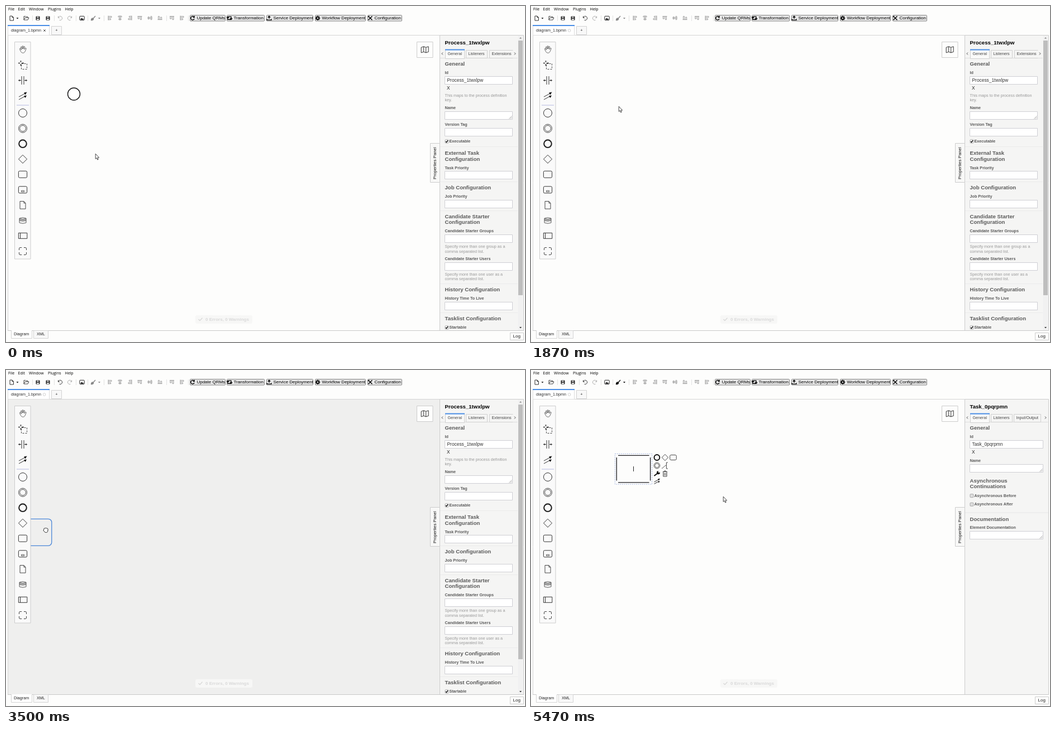
Recreate the animation shown at these times as an HTML page with a canvas. Size 929x603 px, loop 5530 ms.

```html
<!DOCTYPE html>
<html lang="en">
<head>
<meta charset="utf-8">
<title>Process modeler</title>
<style>
html, body { margin: 0; width: 100%; height: 100%; overflow: hidden; background: #fdfdfc; }
canvas { display: block; }
</style>
</head>
<body>
<canvas id="stage" width="929" height="603"></canvas>
<script>
const ctx = document.getElementById('stage').getContext('2d');
const LOOP = 5530;
const SANS = '"Liberation Sans", Arial, sans-serif';
const MENU = '"Open Sans", "Noto Sans", sans-serif';
const PAPER = '#fdfdfc', PANEL = '#f5f5f4';
const INK = '#333', LABEL = '#5a5a5a', BORDER = '#c8c8c8', BLUE = '#4a8ee6';

// Moments at which the state switches, in ms.
const HOVER = 440, SELECT = 800, REMOVE = 1770, GRAB = 3360, DRAG = 3400, BEAM = 4270, DROP = 4300;

const cursorKeys = [
  [30, 160, 265], [150, 150, 237], [300, 134, 190], [420, 125, 165], [500, 122, 158],
  [1130, 122, 158], [1230, 140, 175], [1400, 152, 179], [1600, 157, 180],
  [2330, 157, 180], [2450, 132, 220], [2630, 70, 286], [2760, 38, 299], [2870, 26, 301],
  [2900, 26, 301], [3130, 37, 302], [3330, 37, 302], [3500, 71, 288], [3700, 125, 242],
  [3870, 168, 205], [4000, 193, 187], [4100, 189, 183],
  [5170, 189, 183], [5260, 222, 197], [5370, 305, 219], [5470, 344, 227]
];
const shapeKeys = [
  [3330, 36, 300], [3400, 39, 298], [3500, 51.5, 291.5], [3700, 105, 248],
  [3870, 154.5, 204.5], [4000, 189, 183], [4100, 183.5, 177.5]
];

function track(keys, t) {
  if (t <= keys[0][0]) return keys[0].slice(1);
  for (let i = 1; i < keys.length; i++) {
    const [t0, x0, y0] = keys[i - 1], [t1, x1, y1] = keys[i];
    if (t <= t1) {
      const k = (t - t0) / (t1 - t0);
      return [x0 + (x1 - x0) * k, y0 + (y1 - y0) * k];
    }
  }
  return keys[keys.length - 1].slice(1);
}

function box(x, y, w, h, fill, stroke, radius = 0, lw = 1) {
  ctx.beginPath();
  ctx.roundRect(x, y, w, h, radius);
  if (fill) { ctx.fillStyle = fill; ctx.fill(); }
  if (stroke) { ctx.strokeStyle = stroke; ctx.lineWidth = lw; ctx.stroke(); }
}

function ring(x, y, r, lw = 1, color = INK, fill) {
  ctx.beginPath();
  ctx.arc(x, y, r, 0, 7);
  if (fill) { ctx.fillStyle = fill; ctx.fill(); }
  ctx.strokeStyle = color;
  ctx.lineWidth = lw;
  ctx.stroke();
}

function icon(x, y, d, { color = INK, lw = 1, fill, scale = 1, angle = 0 } = {}) {
  const path = new Path2D(d);
  ctx.save();
  ctx.translate(x, y);
  ctx.rotate(angle);
  ctx.scale(scale, scale);
  if (fill) { ctx.fillStyle = fill; ctx.fill(path); }
  if (lw) { ctx.strokeStyle = color; ctx.lineWidth = lw; ctx.stroke(path); }
  ctx.restore();
}

function text(s, x, y, size = 7.2, color = INK, weight = '', family = SANS) {
  ctx.font = `${weight} ${size}px ${family}`;
  ctx.fillStyle = color;
  ctx.textBaseline = 'middle';
  ctx.fillText(s, x, y);
}

const hline = (x0, x1, y, color = BORDER) => icon(0, 0, `M${x0} ${y}H${x1}`, { color });
const vline = (x, y0, y1, color = BORDER) => icon(0, 0, `M${x} ${y0}V${y1}`, { color });

const DIAMOND = 'M0-7.5L7.5 0L0 7.5L-7.5 0Z';
const CONNECT = 'M-7 2L4-4M-7 7L4 1';
const HEADS = 'M7.5-6.5L4.5-1.5L2-5.5ZM7-.5L4.5 4L2 .2Z';
const DOWN = 'M-2-1H2L0 1.4Z';

function toolbar(selected, dirty) {
  ['File', 'Edit', 'Window', 'Plugins', 'Help'].forEach((s, i) =>
    text(s, [4, 21.5, 41, 75, 105.5][i], 6, 7, '#000', '', MENU));

  const dim = '#a4a4a4', brush = selected ? '#111' : '#888';
  icon(10, 22, 'M-3-4H1L3.5-1.5V4H-3ZM1-4V-1.5H3.5');
  icon(36, 22, 'M-4 3V-3.5H-1L0-2.5H3V-1M-4 3L-2-1H5L3 3Z', { lw: .9 });
  for (const x of [57, 75]) {
    box(x - 3.5, 18.5, 7, 7, '#222', null, 1);
    box(x - 1.8, 19.2, 3.4, 2, '#ddd');
    box(x - 2, 22.8, 4, 2, '#fff');
  }
  const undo = 'M-3.5-1A3.6 3.6 0 1 1-1.5 3.2M-3.6-3.5V-.8H-1';
  icon(97, 22, undo, { color: dirty ? '#222' : dim, lw: .9 });
  icon(114, 22, 'M3.5-1A3.6 3.6 0 1 0 1.5 3.2M3.6-3.5V-.8H1', { color: dim, lw: .9 });
  box(131.8, 18.3, 8.4, 7, '#fff', '#222', 1);
  icon(136, 22, 'M-3 2.7L-1-1L.5 1L1.5 0L3.2 2.7Z', { lw: 0, fill: '#222' });
  icon(156, 22, 'M4-4L0 .5M-3.5 3.5C-3.5 0-1-1 .5 .8C1 2.5-1 4-3.5 3.5Z', { color: brush, lw: 1.4, fill: brush });
  icon(20.5, 22, DOWN, { lw: 0, fill: '#222' });
  icon(167, 22, DOWN, { lw: 0, fill: brush });
  for (const x of [47.5, 86.5, 125.5, 146.5, 175.5, 287.5, 326.5]) vline(x, 17, 27, '#e2e2e2');

  const align = 'M-3-4V4M-3-3H3V-1H-3M-3 1.2H1.5V3.2H-3';
  [0, 0, Math.PI, Math.PI / 2, Math.PI / 2, -Math.PI / 2, Math.PI / 2, 0].forEach((angle, i) =>
    icon([186, 204, 222, 239.5, 257.5, 275.5, 297, 315][i], 21.5,
      i === 1 || i === 4 ? 'M0-4V4M-3-3.5H3V-1.5H-3ZM-2 1.2H2V3.2H-2Z' : align,
      { color: '#8e8e8e', lw: .8, angle }));

  const buttons = [['Update QRMs', 329, 64], ['Transformation', 395, 68], ['Service Deployment', 466, 84],
    ['Workflow Deployment', 553, 91], ['Configuration', 647, 62]];
  buttons.forEach(([s, x, w], i) => {
    box(x + .5, 16.5, w - 1, 10.5, '#e8e8e8', '#808080', 1);
    text(s, x + 12.4, 22, 8, '#000');
    icon(x + 5, 21.8, [
      'M3 1A3.2 3.2 0 1 1 2-2.5M3.2-4V-1.5H.8',
      'M-3 2.5H2M-3 3V-2M-5-.5L-3-2.5L-1-.5M3-3V2M-2-2.7H3M1 .5L3 2.5L5 .5',
      'M0 1V-3M-2.2-1.3L0-3.6L2.2-1.3M-4 1.5V3.3H4V1.5',
      'M0-4.3V4.3M-4.3 0H4.3M-3-3L3 3M-3 3L3-3',
      'M-3.5-3.5L3.5 3.5M3.5-3.5L-3.5 3.5M-4-2L-2-4'][i], { color: '#000', lw: 1.4 });
    if (i === 3) ring(x + 5, 21.8, 2.2, 1.7, '#000', '#e8e8e8');
  });
}

function frameChrome(dirty) {
  box(3.5, 35.5, 74, 17, '#fff', '#ddd');
  box(3, 34, 75, 2, BLUE);
  text('diagram_1.bpmn', 9, 43.6, 7.2, '#333');
  if (dirty) ring(68.5, 44, 2.4, .8, '#c4c4c4');
  else icon(69, 44, 'M-1.8-1.8L1.8 1.8M1.8-1.8L-1.8 1.8', { lw: .9 });
  box(81.5, 36.5, 18, 15, '#f8f8f8', '#d2d2d2');
  text('+', 88.2, 43.6, 7.2);
}

function footer() {
  hline(3, 927, 582.5);
  box(9.5, 582.5, 37, 14, '#fff', '#d4d4d4');
  hline(10, 46, 582.5, '#fff');
  text('Diagram', 14, 589.3, 7.2, '#222');
  box(49.5, 582.5, 26, 14, '#f8f8f8', '#d4d4d4');
  text('XML', 55, 589.3, 7.2, '#222');
  box(902.5, 586.5, 24, 13, PAPER, '#ccc');
  text('Log', 907.5, 592.8, 8, '#222');
}

function palette() {
  box(15.5, 64.5, 28.5, 389.5, '#fafafa', '#ccc');
  const x = 30;
  icon(x, 78, 'M-6 0C-7-2-5-3-4-1L-3 1L-4-4C-4-6-2-6-2-4L-1-1V-6C-1-7.5 1-7.5 1-6V-1L2-5C2-6.5 4-6.5 4-5L3.5 0L5-2C6-3.5 8-2.5 6.5-.5L4 5C3 7.5-2 8-4 4Z', { lw: .8, scale: .9 });
  icon(x, 106, 'M-3.5-8V-5M-3.5-2V1.5M-8-3.5H-5M-2-3.5H2', { lw: 1.4 });
  ctx.setLineDash([3, 2]);
  box(27.5, 103.5, 10, 10, null, INK, 0, .9);
  ctx.setLineDash([]);
  icon(x, 133.5, 'M-2-7.5V7.5M2-7.5V7.5M-8 0H-3M3 0H8', { lw: 1 });
  icon(x, 133.5, 'M-4 0L-6.5-2V2ZM4 0L6.5-2V2Z', { lw: 0, fill: INK });
  icon(x, 161, CONNECT);
  icon(x, 161, HEADS, { lw: 0, fill: '#111' });
  hline(19, 41, 178, '#b4b9e0');
  ring(x, 192, 7.5);
  ring(x, 219.7, 7.5, .9); ring(x, 219.7, 5.4, .9);
  ring(x, 247.2, 6.8, 2.1, '#222');
  icon(x, 274.8, DIAMOND);
  box(22.4, 296.2, 15.2, 12, null, INK, 2);
  box(22.4, 323.8, 15.2, 12, null, INK, 2);
  box(27.5, 331.3, 5, 2.2, null, INK, 0, .8);
  icon(x, 357.3, 'M-5-6.8H2L5-3.5V6.8H-5ZM2-6.8V-3.5H5', { lw: .9 });
  icon(x, 385, 'M-6-4Q0-6.5 6-4V4Q0 6.5-6 4ZM-6-3.5Q0-1.3 6-3.5M-6-1.7Q0 .5 6-1.7M-6 .1Q0 2.3 6 .1', { lw: .8 });
  box(22.4, 407.3, 15.4, 10, null, INK);
  vline(25.5, 407, 417, INK);
  icon(x, 440, 'M-6.5-2V-4.5Q-6.5-6.5-4.5-6.5H-2M2-6.5H4.5Q6.5-6.5 6.5-4.5V-2M6.5 2V4.5Q6.5 6.5 4.5 6.5H2M-2 6.5H-4.5Q-6.5 6.5-6.5 4.5V2');
}

function overlays() {
  palette();
  box(735.5, 64.5, 28.5, 28, PAPER, '#ccc');
  icon(749.7, 78.3, 'M-6.5-4L-2-5.5L2-4L6.5-5.5V4L2 5.5L-2 4L-6.5 5.5ZM-2-5.5V4M2-4V5.5');
  box(339, 555, 102, 15, '#f7f7f6', null, 3);
  icon(348, 562.3, 'M-3.5 0L-1 2.3L3.5-2.5', { color: '#d8d8d8', lw: 1.3 });
  text('0 Errors, 0 Warnings', 357, 562.6, 8, '#d9d9d9', 'bold');
}

function field(y, right, area) {
  box(785.5, y + .5, right - 785.5, 14, '#fff', '#cfcfd4');
  if (area) icon(right - 1, y + 13.5, 'M-5 0L0-5M-2.5 0L0-2.5', { color: '#888', lw: .7 });
}

function check(s, y, on) {
  box(786, y - 3, 6, 6, on ? '#fff' : '#dedede', '#a2a2a2', 1, .9);
  if (on) icon(789, y, 'M-2 0L-.6 1.7L2.2-2', { lw: 1.3, color: '#111' });
  text(s, 793.4, y, 7.2, LABEL, 'bold');
}

const heading = (y, ...lines) => lines.forEach((s, i) => text(s, 785.5, y + i * 10.8, 9.6, LABEL, 'bold'));
const label = (s, y) => text(s, 785.5, y, 7.2, LABEL, 'bold');
const hint = (y, ...lines) => lines.forEach((s, i) => text(s, 785.5, y + i * 8.4, 7.2, '#999'));

function panelHead(id, tabs, right) {
  text(id, 785.5, 66.2, 9.6, '#000', 'bold');
  hline(777, right + 9, 93.5, '#ddd');
  ctx.save();
  ctx.beginPath();
  ctx.rect(780, 76, right - 779, 19);
  ctx.clip();
  tabs.forEach(([s, x, w], i) => {
    box(x + .5, i ? 79.5 : 78.5, w, i ? 14 : 16, i ? PANEL : '#fafaf9', '#d0d0d0');
    if (!i) box(x, 77.5, w + 1, 2, BLUE);
    text(s, x + 4.5, 86.2, 7.2, '#444');
  });
  ctx.restore();
  icon(781, 85.5, 'M1-2L-1 0L1 2', { lw: .9 });
  icon(right + 4.5, 85.5, 'M-1-2L1 0L-1 2', { lw: .9 });
  heading(104.4, 'General');
  label('Id', 120.2);
  field(126, right);
  text(id, 789.5, 133.5, 8.4, '#333');
  text('X', 789, 147.4, 8.4, '#222');
}

function processPanel() {
  const right = 906.5;
  panelHead('Process_1twxlpw', [['General', 786, 34], ['Listeners', 823, 38], ['Extensions', 865, 43]], right);
  hint(161, 'This maps to the process definition', 'key.');
  label('Name', 183.2); field(189, right, true);
  label('Version Tag', 213); field(219, right);
  check('Executable', 243, true);
  heading(264.4, 'External Task', 'Configuration');
  label('Task Priority', 290.8); field(296, right);
  heading(326.5, 'Job Configuration');
  label('Job Priority', 342.2); field(348, right);
  heading(378, 'Candidate Starter', 'Configuration');
  label('Candidate Starter Groups', 404.4); field(410, right);
  hint(432.3, 'Specify more than one group as a', 'comma separated list.');
  label('Candidate Starter Users', 454.2); field(460, right);
  hint(482, 'Specify more than one user as a', 'comma separated list.');
  heading(509.7, 'History Configuration');
  label('History Time To Live', 525.2); field(531, right);
  heading(561, 'Tasklist Configuration');
  check('Startable', 577, true);
  for (const y of [252.5, 315.5, 367.5, 498.5, 550.5]) hline(777, 916, y, '#ebebeb');

  box(916.5, 53, 9, 529, '#f1f1f1');
  box(917, 62, 8, 457, '#bebebe');
  icon(921, 57.5, 'M-2 1H2L0-1.4Z', { lw: 0, fill: '#888' });
  icon(921, 577, DOWN, { lw: 0, fill: '#333' });
}

function asyncGroup(y) {
  heading(y, 'Asynchronous', 'Continuations');
  check('Asynchronous Before', y + 26.7);
  check('Asynchronous After', y + 42.2);
  hline(777, 926, y + 57, '#e6e6e6');
  heading(y + 69, 'Documentation');
  label('Element Documentation', y + 84.5);
  field(y + 90, 916.5, true);
}

function elementPanel(isTask) {
  const right = 916.5;
  if (isTask) {
    panelHead('Task_0pqrpmn', [['General', 786, 34], ['Listeners', 823, 38], ['Input/Output', 864, 48]], right);
  } else {
    panelHead('StartEvent_1', [['General', 786, 34], ['Forms', 823, 29], ['Listeners', 855.5, 38], ['Extensions', 897, 43]], right);
  }
  label('Name', 163.2);
  field(169, right, true);
  if (isTask) return asyncGroup(199);
  heading(199, 'Details');
  label('Initiator', 215); field(220.5, right);
  asyncGroup(250.5);
}

function panel(kind) {
  box(776.5, 52.5, 150, 530, PANEL, '#ccc');
  ctx.save();
  ctx.beginPath();
  ctx.rect(777, 53, 149, 529);
  ctx.clip();
  if (kind === 'process') processPanel();
  else elementPanel(kind === 'task');
  ctx.restore();
  box(759.5, 246.5, 17, 70, '#f8f8f7', '#ccc');
  ctx.save();
  ctx.translate(768, 311);
  ctx.rotate(-Math.PI / 2);
  text('Properties Panel', 0, 0, 7.8, '#111');
  ctx.restore();
}

function contextPad(x, y) {
  const step = 14.5, x1 = x + step, y1 = y + step, y2 = y + 2 * step;
  ring(x, y, 4.9, 2, '#111');
  icon(x1, y, DIAMOND, { scale: .75, lw: 1.2 });
  box(x + 2 * step - 5.7, y - 4.5, 11.5, 9, null, INK, 2, .9);
  ring(x, y1, 5.4, .9, '#444'); ring(x, y1, 3.7, .9, '#444');
  icon(x1, y1, 'M5-5.5H2.5V5.5H5', { lw: .9 });
  ctx.setLineDash([1.5, 1]);
  icon(x1, y1, 'M-5.5 5L2-1', { lw: 1.1 });
  ctx.setLineDash([]);
  icon(x, y2, 'M-5 4L1-.5', { color: '#111', lw: 2 });
  icon(x, y2, 'M5.5-2A3 3 0 1 1 2.5-4.8L2.5-2Z', { lw: 0, fill: '#111' });
  icon(x1, y2, 'M-4-3.5H4M-1.5-3.5V-5H1.5V-3.5M-3.2-3V5H3.2V-3M-1.2-1.5V3.5M1.2-1.5V3.5', { lw: .9 });
  icon(x, y + 42.5, CONNECT, { scale: .7, lw: 1.3, color: '#111' });
  icon(x, y + 42.5, HEADS, { scale: .75, lw: 0, fill: '#111' });
}

function outline(x, y, w, h) {
  ctx.setLineDash([2, 1.6]);
  box(x, y, w, h, null, '#9db0e0', 0, .9);
  ctx.setLineDash([]);
}

function task(t) {
  outline(150.3, 150.3, 66.3, 54.8);
  icon(0, 0, 'M156 153.4H211.5M156 201.8H211.5M153.2 157V198.5M213.6 157V198.5', { color: '#1a1a1f', lw: 1.3 });
  contextPad(225.4, 157);
  if (t < 4800 || t >= 5300) vline(183.5, 173, 182, '#222');
}

function cursor(t) {
  const [x, y] = track(cursorKeys, t);
  if (t >= BEAM && x < 214) {
    icon(x + .5, y + .5, 'M-2-5H-.5L0-4.5L.5-5H2M0-4.5V4.5M-2 5H-.5L0 4.5L.5 5H2', { color: '#222', lw: 1.1 });
  } else if (t >= GRAB && t < BEAM) {
    icon(x, y, 'M-3.5-1.5C-3.5-4-2-4.2-1.2-3.6C0-4.6 1-4.2 1.5-3.5C3-4 4-3 3.8-1L3.3 2C2.5 4.4-1.5 4.4-2.5 2.2L-4.3 .4Z', { color: '#222', fill: '#fff' });
  } else {
    icon(x + .2, y + .2, 'M0 0V9.2L2 7.4L3.5 10.8L5 10.1L3.6 6.9H6.4Z', { color: '#333', lw: .9, fill: '#fff' });
  }
}

function draw(t) {
  const dirty = t >= REMOVE;
  const hasTask = t >= DROP;
  const eventSelected = t >= SELECT && !dirty;
  const dragging = t >= DRAG && !hasTask;

  box(0, 0, 929, 603, PAPER);
  toolbar(eventSelected || hasTask, dirty);
  box(3.5, 52.5, 773, 530, dragging ? '#efefee' : PAPER, '#d4d4d4');
  frameChrome(dirty);

  if (!dirty) {
    ring(121.5, 158, 11, 1.4, '#111', '#fff');
    if (t >= HOVER) outline(107.5, 143.5, 28.5, 28.5);
    if (eventSelected) contextPad(144.4, 150.5);
  }
  if (dragging) {
    const [x, y] = track(shapeKeys, t);
    box(x - 30, y - 24, 60, 48, null, '#4a86d8', 6, 1.3);
  }
  if (hasTask) task(t);

  overlays();
  panel(hasTask ? 'task' : eventSelected ? 'event' : 'process');
  footer();
  cursor(t);
}

const start = performance.now();
function tick() {
  draw((performance.now() - start) % LOOP);
  requestAnimationFrame(tick);
}
tick();
</script>
</body>
</html>
```
